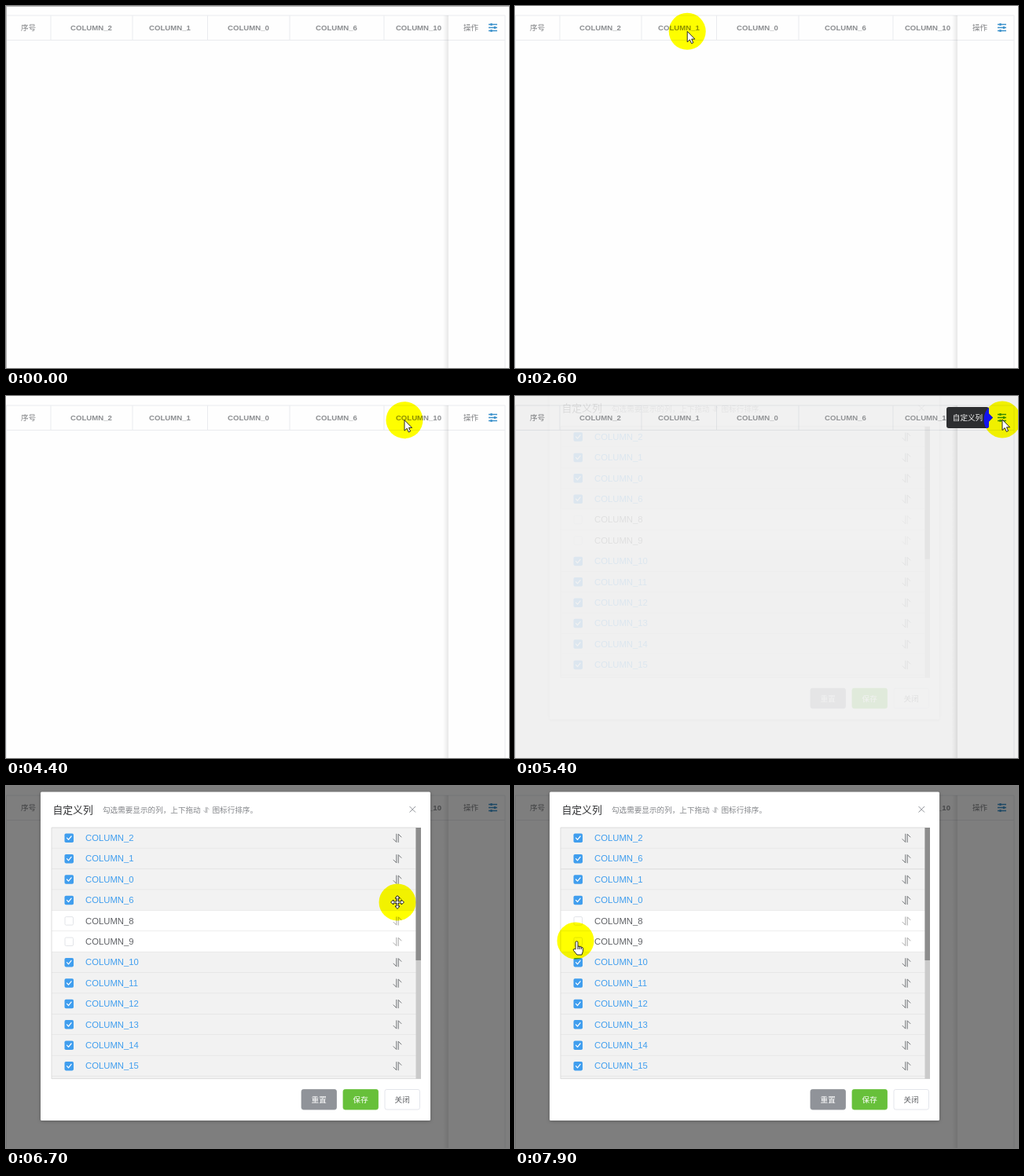
An HTML page that plays this animation: 640 px wide and 461 px high, repeating every 8000 ms.

```html
<!DOCTYPE html>
<html lang="zh">
<head>
<meta charset="utf-8">
<style>
html, body { margin: 0; height: 100%; overflow: hidden; background: #fefefe; }
svg { display: block; width: 100vw; height: 100vh; }
text { font: 9.6px "Liberation Sans", Arial, "Noto Sans CJK SC", "Noto Sans CJK", sans-serif; }
.head { font-weight: bold; fill: #8c8e91; text-anchor: middle; }
.cjk { font-weight: 500; fill: #808285; text-anchor: middle; }
.btn { text-anchor: middle; font-weight: 500; }
.row text { font-size: 11.3px; }
.grid { stroke: #e9ebee; fill: none; }
.thin { fill: none; stroke-linecap: round; stroke-linejoin: round; }
#halo { fill: #ff0; mix-blend-mode: multiply; }
.pointer { fill: #fff; stroke: #111; stroke-width: .9; stroke-linejoin: round; }
</style>
</head>
<body>
<svg viewBox="0 0 640 461" xmlns="http://www.w3.org/2000/svg">
  <defs>
    <linearGradient id="shade">
      <stop offset="0" stop-color="#000" stop-opacity="0"/>
      <stop offset="1" stop-color="#000" stop-opacity=".09"/>
    </linearGradient>
    <clipPath id="spot"><circle cx="620" cy="30" r="23.5"/></clipPath>
    <clipPath id="list"><rect x="58" y="53" width="470" height="320"/></clipPath>
    <path id="bubble" d="M552 14H600a3 3 0 0 1 3 3V22.500L608 27.500 603 32.500V38a3 3 0 0 1-3 3H552a3 3 0 0 1-3-3V17a3 3 0 0 1 3-3Z"/>
    <path id="sort" class="thin" d="M-1.200-5V5.300L-5 1.500M1.200 5.300V-5L5-1.200"/>
    <g id="sliders">
      <path d="M614 23.500h11M614 27.500h11M614 31.500h11" stroke-width="1.300"/>
      <path d="M617.500 22v3M622 26v3M617.500 30v3" stroke-width="2.200"/>
    </g>
  </defs>
  <rect width="640" height="461" fill="#fefefe"/>
  <g id="page"></g>
  <use href="#sliders" stroke="#3f93cc"/>
  <g id="tip">
    <use href="#bubble" fill="#303133"/>
    <text class="btn" x="576" y="31" fill="#fff">自定义列</text>
  </g>
  <path id="edge" d="M0 .5H640M.5 0V461" stroke="#b4b4b4"/>
  <rect id="mask" width="640" height="461"/>
  <g id="dialog"></g>
  <circle id="halo" r="23.500"/>
  <g id="blue" clip-path="url(#spot)">
    <use href="#bubble" fill="#1414ee"/>
    <use id="blueIcon" href="#sliders" stroke="#1a28d0"/>
  </g>
  <g id="cursor" class="pointer">
    <path id="arrow" d="M0 0V13.500L3.200 10.600 5.300 15.400 7.600 14.400 5.500 9.800H9.600Z"/>
    <path id="move" d="M0-8.500L3-5H1V-1H5V-3L8.500 0 5 3V1H1V5H3L0 8.500-3 5H-1V1H-5V3L-8.500 0-5-3V-1H-1V-5H-3Z"/>
    <path id="hand" d="M0 11V2.200a1.500 1.500 0 0 1 3 0V7L8 8.200q1.500.4 1.500 2v3L8 18H2L-2.500 12.500q-1-2 .8-2Z M3 7v4M5.200 8v3M7.400 8.500v2.500"/>
  </g>
</svg>
<script>
const $ = id => document.getElementById(id);
const LOOP = 8000, PITCH = 26.4, OPEN = 5368;

// Table header with its pinned right column
const heads = [[108.5, 2], [208.5, 1], [308.5, 0], [420.5, 6], [525, 10]];
$('page').innerHTML =
  '<path class="grid" d="M0 12H635M0 43.500H635M.5 12V461M57 12V43M161 12V43M256.500 12V43M361 12V43M481 12V43M635 12V461"/>' +
  heads.map(([x, n]) => `<text class="head" x="${x}" y="30.500">COLUMN_${n}</text>`).join('') +
  '<rect x="556" y="12" width="7" height="449" fill="url(#shade)"/>' +
  '<text class="cjk" x="28.500" y="30.700">序号</text><text class="cjk" x="591.500" y="30.700">操作</text>';

// Column chooser
function row(n, i) {
  const off = n === 8 || n === 9;
  const box = off
    ? '<rect x="75" y="8" width="10.500" height="10.500" rx="1.500" fill="#fff" stroke="#e2e4e8"/>'
    : '<rect x="74.500" y="7.500" width="11.500" height="11.500" rx="1.800" fill="#409eee"/><path class="thin" d="M77.500 13.200l2 2.200 3.600-4.400" stroke="#fff" stroke-width="1.200"/>';
  return `<g class="row"><rect x="58" width="464" height="${PITCH}" fill="${off ? '#fff' : '#f2f2f2'}"/>
    <path d="M58 ${PITCH}H522" stroke="#dcdcdc"/>${box}
    <text x="101" y="17" fill="${off ? '#606266' : '#409eee'}">COLUMN_${n}</text>
    <use href="#sort" x="498" y="13.200" stroke="${off ? '#aaa' : '#74777a'}"/></g>`;
}
const button = (x, label, fill, stroke, ink) =>
  `<rect x="${x}" y="386.500" width="44.500" height="25.500" rx="2.400" fill="${fill}" stroke="${stroke}" stroke-width=".8"/>
   <text class="btn" x="${x + 22.2}" y="402.800" fill="${ink}">${label}</text>`;
$('dialog').innerHTML = `
  <rect x="44" y="7.500" width="496" height="418.500" rx="1.500" fill="#fff" style="filter:drop-shadow(0 1px 2px #0004)"/>
  <text x="59.500" y="34.500" fill="#303133" style="font-size:12.800px">自定义列</text>
  <text x="123" y="34" fill="#84868a">勾选需要显示的列，上下拖动</text>
  <use href="#sort" transform="translate(255 30.500) scale(.65)" stroke="#84868a"/>
  <text x="262.500" y="34" fill="#84868a">图标行排序。</text>
  <path d="M513.500 26l7.500 7.500m0-7.500l-7.500 7.500" stroke="#909399"/>
  <g clip-path="url(#list)">${[2, 1, 0, 6, 8, 9, 10, 11, 12, 13, 14, 15, 16].map(row).join('')}</g>
  <path d="M58 53H522M58 53V373M58 372.700H528" fill="none" stroke="#dcdcdc"/>
  <rect x="521.500" y="53" width="6.500" height="320" fill="#cacaca"/>
  <rect x="521.500" y="53" width="6.500" height="169" fill="#8c8c8c"/>
  ${button(376, '重置', '#909399', '#909399', '#fff')}
  ${button(429, '保存', '#67c03a', '#67c03a', '#fff')}
  ${button(482, '关闭', '#fff', '#dcdfe6', '#606266')}`;
const rows = [...document.querySelectorAll('.row')];

// Pointer path: time, x, y
const path = [
  [600, 530, 490], [1100, 380, 190], [1700, 113, 33], [1900, 113, 33],
  [3400, 349, 31.5], [3650, 349, 31.5], [5000, 620, 30], [5680, 620, 30],
  [6500, 498, 148], [6750, 498, 148], [7200, 498, 97], [7350, 498, 97],
  [7800, 77, 197], [LOOP, 77, 197]
];
const clamp = v => Math.max(0, Math.min(1, v));
const smooth = p => p * p * (3 - 2 * p);
function pointerAt(t) {
  const i = Math.max(1, path.findIndex(k => k[0] > t));
  const [t0, x0, y0] = path[i - 1], [t1, x1, y1] = path[i];
  const p = smooth(clamp((t - t0) / (t1 - t0)));
  return [x0 + (x1 - x0) * p, y0 + (y1 - y0) * p];
}
const show = (id, on) => { $(id).style.display = on ? '' : 'none'; };

function draw(t) {
  show('edge', t < 100);
  const hover = t >= 5000 && t < 5700, clicked = t >= 5500 && t < 5700;
  show('tip', hover);
  show('blue', hover);
  show('blueIcon', clicked);

  const p = clamp((t - OPEN) / 300);
  const fade = 1 - (1 - p ** 1.4) ** 2.6;
  $('mask').setAttribute('opacity', fade / 2);
  $('dialog').setAttribute('opacity', fade);
  $('dialog').setAttribute('transform', `translate(0 ${-16 * (1 - fade)})`);

  // Row 3 is dragged up past rows 2 and 1
  const slot = t < 6890 ? 3 : t < 7110 ? 2 : 1;
  rows.forEach((el, i) => {
    const at = i === 3 ? slot : i < 3 && i >= slot ? i + 1 : i;
    el.setAttribute('transform', `translate(0 ${53 + at * PITCH})`);
  });

  const [x, y] = pointerAt(t), place = `translate(${x} ${y})`;
  const moving = t >= 6430 && t < 7400, pointing = t >= 7680;
  $('halo').setAttribute('transform', place);
  $('cursor').setAttribute('transform', place);
  show('halo', t >= 600 && !clicked);
  show('cursor', t >= 600);
  show('move', moving);
  show('hand', pointing);
  show('arrow', !moving && !pointing);
}

let start;
function tick(now) {
  start ??= now;
  draw((now - start) % LOOP);
  requestAnimationFrame(tick);
}
draw(0);
requestAnimationFrame(tick);
</script>
</body>
</html>
```
